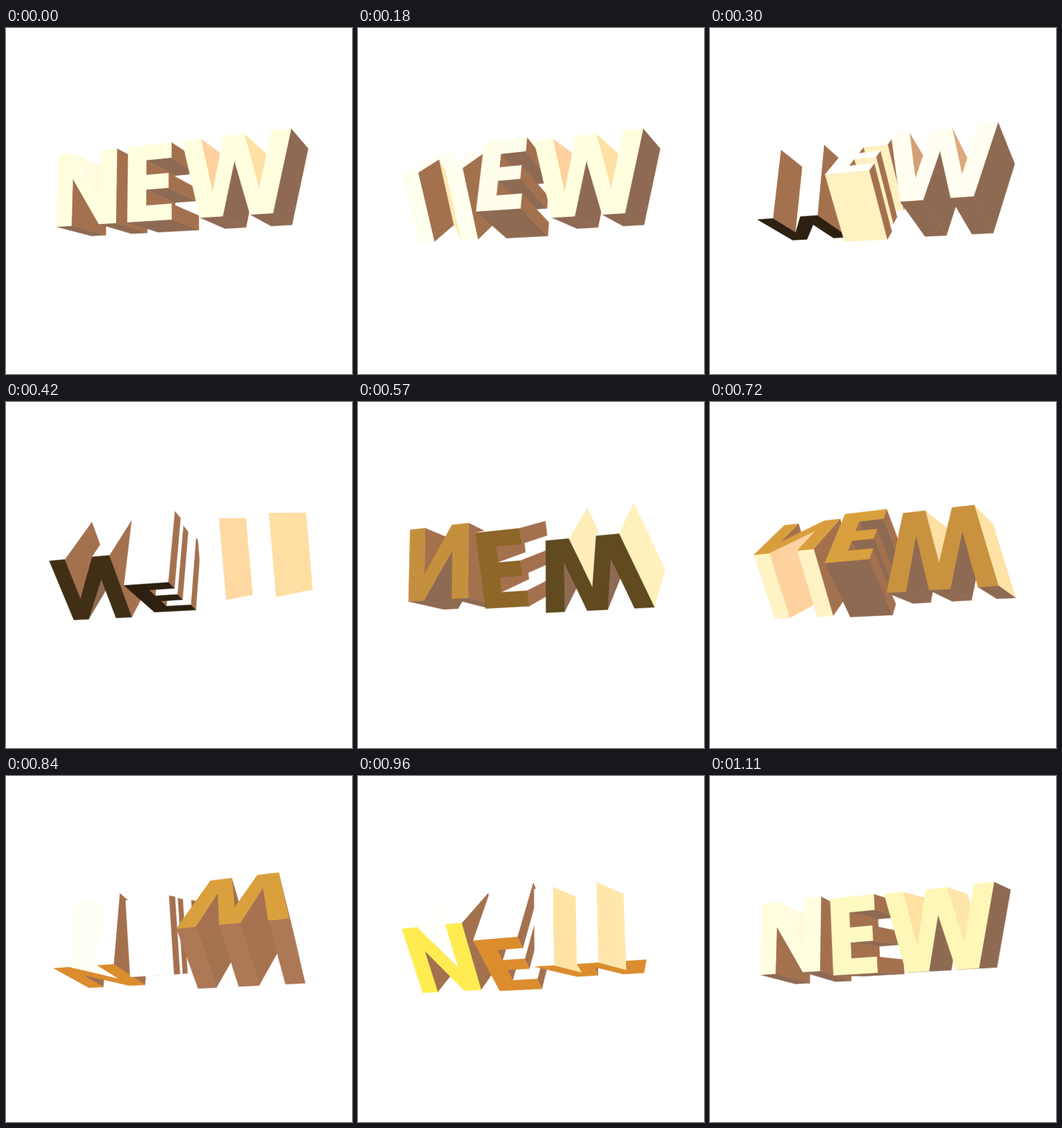
These frames come from a looping animation (480x480 px, 1140 ms). An HTML page with a canvas:

```html
<!DOCTYPE html>
<html lang="en">
<head>
<meta charset="utf-8">
<title>NEW</title>
<style>
html, body { margin: 0; width: 100%; height: 100%; overflow: hidden; background: #fff; }
canvas { display: block; width: 480px; height: 480px; }
</style>
</head>
<body>
<canvas id="stage" width="480" height="480"></canvas>
<script>
const ctx = document.getElementById('stage').getContext('2d');
const LOOP = 1140, STEP = 30, HALF = 50;

// Outlines run clockwise (y up); turn holds [ms, degrees] keys.
const letters = [
  {
    outline: [[0,-50],[0,50],[20,50],[56,-15],[56,50],[76,50],[76,-50],[55,-50],[20,15],[20,-50]],
    turn: [[0,0],[180,61],[420,136],[570,179],[720,233],[960,323],[1070,360],[1140,360]]
  },
  {
    outline: [[90,-50],[90,50],[141.5,50],[141.5,30],[112,30],[112,10],[138,10],[138,-9],[112,-9],
      [112,-30],[141.5,-30],[141.5,-50]],
    turn: [[0,0],[80,0],[180,13],[420,103],[570,161],[720,217],[960,303],[1110,353],[1140,360]]
  },
  {
    outline: [[154,50],[175,50],[187,-20],[200,50],[222,50],[236,-20],[250,50],[270,50],[249,-50],
      [226,-50],[211,18],[197.5,-50],[173,-50]],
    turn: [[0,0],[225,0],[420,77],[570,143],[720,180],[960,270],[1110,351],[1140,360]]
  }
];

// Colour by amount of light, per material.
const sideRamp = [[-.05,'8f6a52'],[0,'a4714f'],[.05,'c89068'],[.11,'ffd3a0'],[.13,'ffe3a5'],
  [.2,'fff0bc'],[.36,'fffff0'],[.5,'ffffff']];
const frontRamp = [[-.1,'db8c2d'],[.22,'ffec50'],[.656,'fef7b8'],[.766,'ffffe0'],[.89,'fffeea'],[1,'ffffff']];
const backRamp = [[-.2,'2d2010'],[.1,'3f2e15'],[.22,'604920'],[.515,'8d6628'],[.766,'c8923f'],[1,'daa03e']];

function shade(ramp, light) {
  let i = 1;
  while (i < ramp.length - 1 && light > ramp[i][0]) i++;
  const [l0, c0] = ramp[i - 1], [l1, c1] = ramp[i];
  const k = Math.min(1, Math.max(0, (light - l0) / (l1 - l0)));
  const part = (c, n) => parseInt(c.substr(2 * n, 2), 16);
  return `rgb(${[0, 1, 2].map(n => Math.round(part(c0, n) * (1 - k) + part(c1, n) * k))})`;
}

// Smooth monotone curve through the keys.
function angleAt(keys, t) {
  const slope = i => i < 0 || i >= keys.length - 1 ? 0
    : (keys[i + 1][1] - keys[i][1]) / (keys[i + 1][0] - keys[i][0]);
  const tangent = i => {
    const a = slope(i - 1), b = slope(i);
    return a * b ? 2 * a * b / (a + b) : 0;
  };
  let i = 0;
  while (i < keys.length - 2 && t >= keys[i + 1][0]) i++;
  const [t0, a0] = keys[i], [t1, a1] = keys[i + 1], d = t1 - t0;
  const u = (t - t0) / d, e = u * u * (3 - 2 * u);
  return a0 + (a1 - a0) * e
    + d * u * (1 - u) * ((1 - u) * tangent(i) - u * tangent(i + 1));
}

// Three-point perspective given by its vanishing points.
function project(x, y, z) {
  const a = -.000516 * x, b = .000209 * y, c = .000893 * z, w = 1 + a + b + c;
  return [
    (96.6 - 1841 * a + 220 * b + 638 * c) / w,
    (234.4 + 396 * a - 4302 * b + 423 * c) / w
  ];
}

function area(points) {
  return points.reduce((sum, [x, y], i) => {
    const [nx, ny] = points[(i + 1) % points.length];
    return sum + x * ny - nx * y;
  }, 0);
}

function fill(points, color) {
  ctx.beginPath();
  points.forEach(p => ctx.lineTo(...p));
  ctx.closePath();
  ctx.fillStyle = ctx.strokeStyle = color;
  ctx.fill();
  ctx.stroke();
}

function drawLetter({ outline, turn }, t) {
  const angle = angleAt(turn, t) * Math.PI / 180;
  const cos = Math.cos(angle), sin = Math.sin(angle);
  const cap = z => outline.map(([x, y]) => project(x, y * cos - z * sin, y * sin + z * cos));
  const front = cap(-HALF), back = cap(HALF);
  const viewY = -.2 * cos - .89 * sin;

  const walls = outline.map(([x, y], i) => {
    const j = (i + 1) % outline.length, [x2, y2] = outline[j];
    const normalY = (x2 - x) / Math.hypot(x2 - x, y2 - y);
    return {
      points: [front[i], back[i], back[j], front[j]],
      light: normalY * (.643 * cos - .766 * sin),
      near: .41 * (x + x2) + viewY * (y + y2)
    };
  });
  walls.filter(w => area(w.points) > 0)
    .sort((a, b) => a.near - b.near)
    .forEach(w => fill(w.points, shade(sideRamp, w.light)));

  const light = .643 * sin + .766 * cos;
  if (area(front) > 0) fill(front, shade(frontRamp, light));
  if (area(back) < 0) fill(back, shade(backRamp, -light));
}

function draw() {
  const t = Math.floor(performance.now() % LOOP / STEP) * STEP;
  ctx.fillStyle = '#fff';
  ctx.fillRect(0, 0, 480, 480);
  ctx.lineWidth = .5;
  ctx.lineJoin = 'round';
  letters.forEach(letter => drawLetter(letter, t));
  requestAnimationFrame(draw);
}
draw();
</script>
</body>
</html>
```
